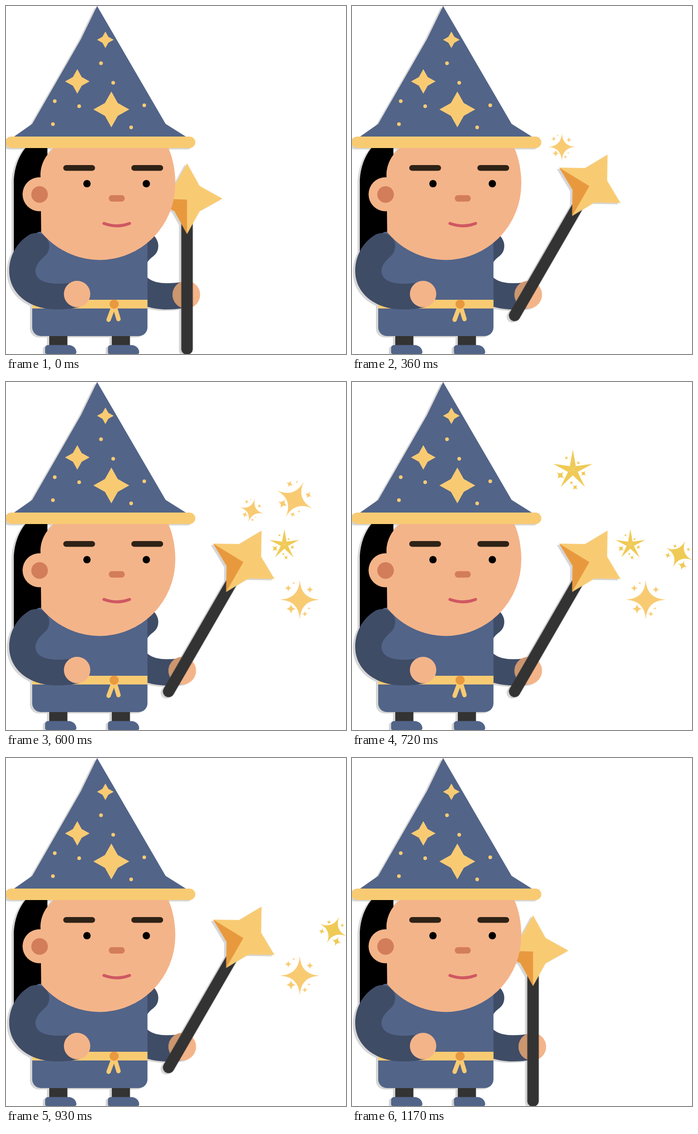
An HTML page that plays this animation: 739x757 px, repeating every 1.2 s.

```html
<!DOCTYPE html>
<html lang="en">
<head>
<meta charset="utf-8">
<title>Wizard casting stars</title>
<style>
  html, body { margin: 0; width: 100%; height: 100%; overflow: hidden; background: #fff; }
  svg { display: block; width: 739px; height: 757px; }

  .robe { fill: #526488; }
  .sleeve { fill: #3f4c66; }
  .gold { fill: #f8cb73; }
  .amber { fill: #e8993e; }
  .lemon { fill: #efca56; }
  .skin { fill: #f4b489; }
  .blush { fill: #d37d5a; }
  .dark { fill: #333; }
  .brow { fill: #2e2216; }
  .shadowed { filter: drop-shadow(-5px 3px 0 #d6d6d6); }

  .wand, .grip, .spark { animation: 1200ms step-end infinite; }
  .wand { animation-name: wand; }
  .grip { animation-name: grip; }
  .spark { visibility: hidden; }

  @keyframes wand {
    0%, 97.5% { transform: translate(393.5px, 419px); }
    22.5% { transform: translate(517px, 390px) rotate(30deg); }
  }
  @keyframes grip {
    0%, 97.5% { transform: translate(392px, 628px); }
    22.5% { transform: translate(383.2px, 628px) rotate(30deg); }
  }

  /* each sparkle pops in and out without fading */
  #s1 { animation-name: pop1; }
  #s2 { animation-name: pop2; }
  #s3 { animation-name: pop3; }
  #s4 { animation-name: pop4; }
  #s5 { animation-name: pop5; }
  #s6 { animation-name: pop6; }
  #s7 { animation-name: pop7; }
  @keyframes pop1 { 25% { visibility: visible; } 0%, 50%, 100% { visibility: hidden; } }
  @keyframes pop2 { 32.5% { visibility: visible; } 0%, 52.5%, 100% { visibility: hidden; } }
  @keyframes pop3 { 35% { visibility: visible; } 0%, 60%, 100% { visibility: hidden; } }
  @keyframes pop4 { 42.5% { visibility: visible; } 0%, 72.5%, 100% { visibility: hidden; } }
  @keyframes pop5 { 42.5% { visibility: visible; } 0%, 80%, 100% { visibility: hidden; } }
  @keyframes pop6 { 52.5% { visibility: visible; } 0%, 70%, 100% { visibility: hidden; } }
  @keyframes pop7 { 60% { visibility: visible; } 0%, 87.5%, 100% { visibility: hidden; } }
</style>
</head>
<body>
<svg viewBox="0 0 739 757" xmlns="http://www.w3.org/2000/svg">
  <defs>
    <path id="star" d="M0-77L27.5-27.5L77 0L27.5 27.5L0 77L-27.5 27.5L-77 0L-27.5-27.5Z"/>
    <path id="glint" d="M0-10Q.5-.5 10 0Q.5.5 0 10Q-.5.5-10 0Q-.5-.5 0-10Z"/>
    <path id="thin" d="M0-10Q-.8.8 10 0Q-.8-.8 0 10Q.8-.8-10 0Q.8.8 0-10Z"/>
    <path id="ray" d="M0-45L-6.5-9L0 0L6.5-9Z"/>
    <g id="burst">
      <use href="#glint" transform="scale(4.3)"/>
      <use href="#thin" transform="translate(-25 -25) scale(1.1)"/>
      <use href="#thin" transform="translate(-13 -36) scale(.42)"/>
      <use href="#thin" transform="translate(22 -22) scale(1.1)"/>
      <use href="#glint" transform="translate(-19 20) scale(1.2)"/>
      <use href="#glint" transform="translate(11 31) scale(.65)"/>
      <use href="#thin" transform="translate(20 19) scale(.45)"/>
    </g>
    <g id="flare">
      <use href="#ray"/>
      <use href="#ray" transform="rotate(72)"/>
      <use href="#ray" transform="rotate(144)"/>
      <use href="#ray" transform="rotate(216)"/>
      <use href="#ray" transform="rotate(288)"/>
      <use href="#glint" transform="translate(-14 -27) rotate(40) scale(.5)"/>
      <use href="#glint" transform="translate(12 -16) rotate(40) scale(.5)"/>
      <use href="#glint" transform="translate(-27 11) rotate(40) scale(1.1)"/>
      <use href="#glint" transform="translate(23 7) rotate(40) scale(.75)"/>
      <use href="#glint" transform="translate(-3 27) rotate(40) scale(.5)"/>
      <use href="#glint" transform="translate(5 37) rotate(40) scale(.75)"/>
    </g>
    <path id="shoe" class="robe" d="M0 26V749L0 744Q0 737.500 7 737.500H50C61 737.500 68 745 68 753Q68 757 64 757H4Q0 757 0 753Z"/>
  </defs>

  <g class="shadowed">
    <path d="M42 309C26 329 17 356 17 385V545H90V300H48Z"/>

    <!-- far arm, hand and wand -->
    <path class="sleeve" d="M300 495H316C326 502 331 512 331 522C331 534 325 541 318 546C311 551 307 558 307 558H300Z"/>
    <path class="sleeve" d="M300 586L307.500 591C318 600 334 603 350 603C362 603 374 602 385 600L390 656C376 659 362 660 348 660C334 660 319 658 300 652Z"/>
    <g class="grip">
      <circle class="skin" r="30"/>
      <path fill="#cc966f" d="M0-30A30 30 0 0 0 0 30Z"/>
    </g>
    <g class="wand">
      <rect class="dark" x="-12.500" y="0" width="25" height="339.500" rx="12.500"/>
      <use href="#star" class="gold"/>
      <path class="amber" d="M0 2L-77 0L-27.500 27.500L0 77Z"/>
    </g>

    <!-- legs and robe -->
    <path class="dark" d="M94 710H133.500V745H94ZM230 710H269.500V745H230Z"/>
    <use href="#shoe" x="85"/>
    <use href="#shoe" x="221.500"/>
    <rect class="robe" x="57" y="491" width="250.500" height="227" rx="19"/>
    <path class="gold" d="M57 639H307.500V658H57Z"/>
    <path d="M234 653L223 682.500M236 653L244.500 681" fill="none" stroke="#f8cb73" stroke-width="9.500" stroke-linecap="round"/>
    <circle class="amber" cx="235" cy="648.500" r="10"/>

    <!-- near arm -->
    <path class="sleeve" d="M66 494C81 494 94 506 94 522C94 536 86 543 80 548C70 557 64 567 64 577C65 595 83 604 112 604C130 604 141 602 150 599L160 655C146 658 130 660 110 660C50 660 7 625 7 576C7 542 25 513 50 498C55 495 60 494 66 494Z"/>
    <circle class="skin" cx="154.500" cy="626.500" r="28.700"/>

    <!-- head -->
    <path class="skin" d="M110 303L103 309C85 326 74 346 75 372L76.500 492A165 165 0 0 0 203 552.500A165 166 0 0 0 368 386C368 358 363 332 353 309L350 303Z"/>
    <circle class="skin" cx="73" cy="409.500" r="37"/>
    <circle class="blush" cx="73" cy="410" r="18"/>
    <rect class="brow" x="124.500" y="346" width="69" height="12.500" rx="6.250"/>
    <rect class="brow" x="272.500" y="346" width="69" height="12.500" rx="6.250"/>
    <circle cx="176" cy="386.500" r="8"/>
    <circle cx="305" cy="386.500" r="8"/>
    <rect class="blush" x="223.500" y="411.500" width="34.500" height="14" rx="6.500"/>
    <path d="M213 473Q241 483.500 268.500 473" fill="none" stroke="#cf5763" stroke-width="6.500" stroke-linecap="round"/>

    <!-- hat -->
    <path class="robe" d="M198 0L347 256.500L394 286H15L57 256.500L163 72Z"/>
    <rect class="gold" x="-1" y="284" width="412.500" height="25" rx="12.500"/>
    <g class="gold">
      <use href="#star" transform="translate(216 73.500) scale(.235)"/>
      <use href="#star" transform="translate(155 164) scale(.347)"/>
      <use href="#star" transform="translate(229 225) scale(.507)"/>
      <circle cx="206.500" cy="124.500" r="4"/>
      <circle cx="233" cy="167" r="4"/>
      <circle cx="106" cy="207" r="4"/>
      <circle cx="159" cy="218" r="4"/>
      <circle cx="300.500" cy="216" r="4"/>
      <circle cx="102" cy="257" r="4"/>
      <circle cx="272" cy="264" r="4"/>
    </g>
  </g>

  <!-- sparkles -->
  <g id="s1" class="spark gold"><use href="#burst" transform="translate(456 306.500) scale(.7)"/></g>
  <g id="s2" class="spark gold"><use href="#burst" transform="translate(534 279.500) rotate(15) scale(.62)"/></g>
  <g id="s3" class="spark gold"><use href="#burst" transform="translate(627.500 255.500) rotate(27)"/></g>
  <g id="s4" class="spark lemon"><use href="#flare" transform="translate(605 354) scale(.755)"/></g>
  <g id="s5" class="spark gold"><use href="#burst" transform="translate(638.500 473.500)"/></g>
  <g id="s6" class="spark lemon"><use href="#flare" transform="translate(480 192)"/></g>
  <g id="s7" class="spark lemon">
    <use href="#glint" transform="translate(711 374) rotate(25) scale(3.200)"/>
    <use href="#glint" transform="translate(702 357) rotate(20) scale(.55)"/>
    <use href="#glint" transform="translate(731 364) rotate(20) scale(.5)"/>
    <use href="#glint" transform="translate(686.500 377) rotate(20) scale(.75)"/>
    <use href="#glint" transform="translate(718.500 399) rotate(20) scale(1.150)"/>
  </g>
</svg>
</body>
</html>
```
